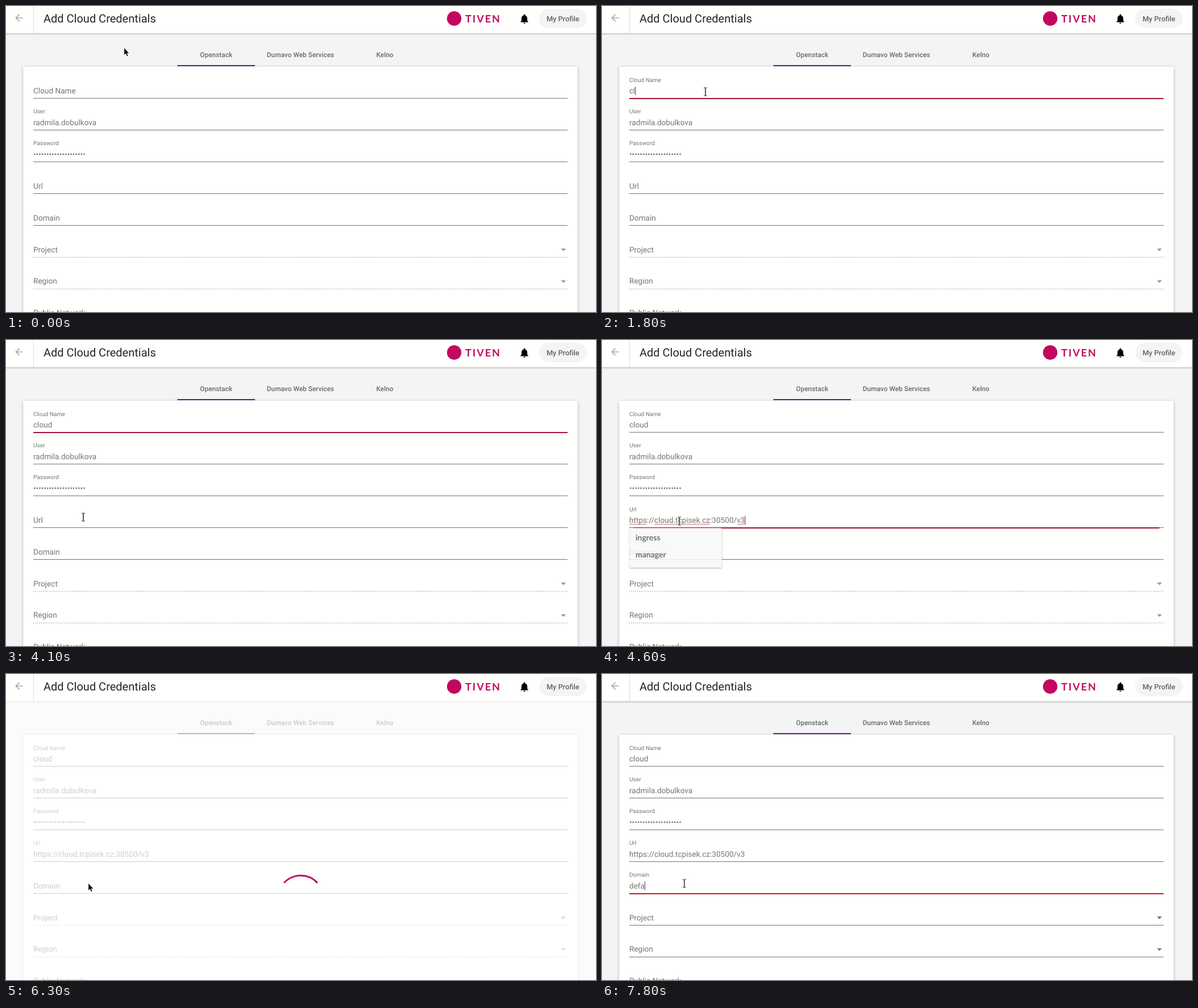
An HTML page that plays this animation: 1038x539 px, repeating every 8000 ms.

```html
<!DOCTYPE html>
<html lang="en">
<head>
<meta charset="utf-8">
<title>Add Cloud Credentials</title>
<style>
html, body { margin: 0; width: 100%; height: 100%; overflow: hidden; background: #f3f5f5; }
svg { display: block; width: 100vw; height: 100vh; }
text { font-family: Roboto, sans-serif; text-rendering: geometricPrecision; white-space: pre; }
.field { font-size: 13.6px; fill: #757575; }
.tab { font-size: 11.9px; font-weight: 500; fill: #696969; text-anchor: middle; }
.item { font: 700 14px Lato, sans-serif; fill: #5c5c5c; }
</style>
</head>
<body>
<svg id="stage" viewBox="0 0 1038 539" preserveAspectRatio="none">
  <defs>
    <filter id="cardShadow" x="-5%" y="-5%" width="110%" height="110%">
      <feDropShadow dx="0" dy="1.5" stdDeviation="2.6" flood-opacity=".32"/>
    </filter>
    <filter id="barShadow" x="-2%" y="-20%" width="104%" height="160%">
      <feDropShadow dx="0" dy="1" stdDeviation="1.8" flood-opacity=".3"/>
    </filter>
    <filter id="popShadow" x="-10%" y="-10%" width="120%" height="125%">
      <feDropShadow dx="0" dy="1" stdDeviation="1" flood-opacity=".4"/>
    </filter>
  </defs>
  <rect width="1038" height="539" fill="#f3f5f5"/>
  <rect x="-10" y="-10" width="1058" height="58" fill="#fffffd" filter="url(#barShadow)"/>
  <g id="page">
    <text class="tab" x="369.7" y="89.8">Openstack</text>
    <text class="tab" x="518" y="89.8">Dumavo Web Services</text>
    <text class="tab" x="666.5" y="89.8">Kelno</text>
    <rect x="30.5" y="107" width="975" height="460" rx="2" fill="#fffffd" filter="url(#cardShadow)"/>
    <rect x="301.5" y="104" width="136.5" height="2" fill="#6d1a86"/>
  </g>
  <g id="popup" filter="url(#popShadow)">
    <rect id="popupBox" x="48.5" width="162.5" rx="2" fill="#f8f9f8"/>
  </g>
  <g id="loader">
    <rect id="veil" y="48" width="1038" height="491" fill="#fffffd"/>
    <path id="spinner" d="M489 368A40 40 0 0 1 548 368" fill="none" stroke="#bd0a62" stroke-width="2.8"/>
  </g>
  <g id="header">
    <path d="M20 11H7.83l5.59-5.59L12 4l-8 8 8 8 1.41-1.41L7.83 13H20v-2z" transform="translate(12.8 10.8) scale(.85)" fill="#ababab"/>
    <rect x="48" width="1" height="48" fill="#dcdddc"/>
    <text x="66" y="29" font-size="20" fill="#252525">Add Cloud Credentials</text>
    <circle cx="788.5" cy="22" r="12.7" fill="#c2075f"/>
    <text x="808" y="28.8" fill="#c2075f" style="font:700 18px Lato,sans-serif;letter-spacing:2px">TIVEN</text>
    <path d="M12 22c1.1 0 2-.9 2-2h-4c0 1.1.89 2 2 2zm6-6v-5c0-3.07-1.64-5.64-4.5-6.32V4c0-.83-.67-1.5-1.5-1.5s-1.5.67-1.5 1.5v.68C7.63 5.36 6 7.92 6 11v5l-2 2v1h16v-1l-2-2z" transform="translate(901.8 12.4) scale(.85)"/>
    <rect x="938" y="5" width="83.5" height="34" rx="17" fill="#f3f5f4"/>
    <text x="979.8" y="26.6" font-size="12.75" font-weight="500" fill="#636363" text-anchor="middle">My Profile</text>
  </g>
  <path id="arrow" d="M0 0V12L2.7 9.6 4.7 14.2 6.6 13.3 4.6 8.9H8.2Z" fill="#111" stroke="#fff" stroke-width=".7" paint-order="stroke"/>
  <g id="beam" fill="none">
    <path d="M-3-7H-1Q0-7 0-6V6Q0 7-1 7H-3M3-7H1Q0-7 0-6V6Q0 7 1 7H3" stroke="#fff" stroke-width="2.6"/>
    <path d="M-3-7H-1Q0-7 0-6V6Q0 7-1 7H-3M3-7H1Q0-7 0-6V6Q0 7 1 7H3" stroke="#222" stroke-width="1"/>
  </g>
</svg>
<script>
const LOOP = 8000, LEFT = 48, WIDTH = 940, PITCH = 55.9;
const $ = id => document.getElementById(id);
const clamp = v => Math.max(0, Math.min(1, v));
const easeOut = v => 1 - (1 - clamp(v)) ** 3;

function add(parent, tag, attrs, text) {
  const el = document.createElementNS("http://www.w3.org/2000/svg", tag);
  for (const k in attrs) el.setAttribute(k, attrs[k]);
  if (text) el.textContent = text;
  parent.append(el);
  return el;
}
const set = (el, attrs) => { for (const k in attrs) el.setAttribute(k, attrs[k]); };
const show = (el, on) => el.setAttribute("visibility", on ? "visible" : "hidden");

// keys: [time, value]; popup: [opens, starts to fade, items]
const fields = [
  { label: "Cloud Name", focus: 900, blur: 4300, color: () => "#a31238",
    keys: [[1400, "c"], [1700, "cl"], [2000, "clou"], [2100, "cloud"]], popup: [1000, 1400, 3] },
  { label: "User", value: "radmila.dobulkova" },
  { label: "Password", value: "•".repeat(20) },
  { label: "Url", focus: 4300, blur: 5600, color: t => t < 4900 ? "#99102a" : "#c4121c",
    keys: [[4600, "https://cloud.tcpisek.cz:30500/v3"]], popup: [4400, 4600, 2] },
  { label: "Domain", focus: 6700, blur: 9000, color: () => "#d5101a",
    keys: [[6800, "d"], [6900, "de"], [7800, "defa"]], popup: [6700, 6900, 3] },
  { label: "Project", select: true },
  { label: "Region", select: true },
  { label: "Public Network", select: true }
];

const page = $("page");
fields.forEach((f, i) => {
  f.base = 154 + PITCH * i;
  f.lineY = 162 + 56 * i;
  f.labelEl = add(page, "text", { class: "field" }, f.label);
  f.valueEl = add(page, "text", { class: "field", x: LEFT, y: f.base }, f.value);
  f.lineEl = add(page, "path", { d: `M${LEFT} ${f.lineY + .5}h${WIDTH}`, stroke: "#737373" });
  if (f.select) f.mark = add(page, "path", { d: `M976.3 ${f.base - 27.6 + 25.4 - 4}h8.8l-4.4 4.4z` });
  if (f.keys) {
    f.focusEl = add(page, "rect", { y: f.lineY, height: 2 });
    f.caret = add(page, "rect", { y: f.base - 12, width: 1, height: 15, fill: "#6d1a86" });
  }
});

const popupItems = ["ingress", "manager", "cloud"].map(s => add($("popup"), "text", { class: "item", x: 59 }, s));

// spell-check waves under the words of the address
const url = fields[3];
const wave = (from, to) => {
  let d = `M${from} ${url.base + 2}`;
  for (let x = from, up = false; x < to; x += 2, up = !up) d += `l2 ${up ? -1.8 : 1.8}`;
  return d;
};
const waves = add(page, "path", { d: wave(48, 78) + wave(92, 189) + wave(238, 252),
  fill: "none", stroke: "#d8384a", "stroke-width": .9 });

// time, x, y, text pointer or arrow
const pointer = [
  [0, 208, 74, 0], [400, 186, 138, 0], [500, 186, 138, 0], [600, 186, 138, 1], [700, 182, 151, 1],
  [2900, 182, 151, 1], [3000, 181, 166, 0], [3200, 173.5, 205, 0], [3400, 177, 232, 0],
  [3500, 177, 232, 0], [3800, 165, 262, 0], [3900, 165, 262, 0], [4000, 151, 286, 0],
  [4100, 136, 312, 1], [4200, 136, 312, 1], [4300, 136, 319, 1], [4800, 136, 319, 1],
  [5100, 145.5, 369, 1], [5600, 146, 369, 0], [6500, 144.8, 369, 1], [8000, 144.8, 369, 1]
];

function drawPointer(t) {
  let i = 0;
  while (i < pointer.length - 2 && pointer[i + 1][0] <= t) i++;
  const [t0, x0, y0, beam] = pointer[i], [t1, x1, y1] = pointer[i + 1];
  const u = (t - t0) / (t1 - t0);
  const el = beam ? $("beam") : $("arrow");
  set(el, { transform: `translate(${x0 + (x1 - x0) * u} ${y0 + (y1 - y0) * u})` });
  show($("beam"), beam);
  show($("arrow"), !beam);
}

function drawField(f, t) {
  let value = f.value || "", last = f.focus;
  for (const [at, s] of f.keys || []) if (t >= at) { value = s; last = at; }
  if (f.valueEl.textContent !== value) f.valueEl.textContent = value;

  const p = f.focus ? easeOut((t - f.focus) / 400) : f.value ? 1 : 0;
  set(f.labelEl, { transform: `translate(${LEFT} ${f.base - 20.5 * p}) scale(${1 - .25 * p})` });

  if (f.select) {
    const ready = t >= 6500;
    set(f.lineEl, { "stroke-dasharray": ready ? "none" : "1.13 2.27" });
    set(f.mark, { fill: ready ? "#6e6e6e" : "#969696" });
  }
  if (f.keys) {
    const on = t >= f.focus && t < f.blur;
    const w = WIDTH * p;
    show(f.focusEl, on);
    set(f.focusEl, { x: LEFT + (WIDTH - w) / 2, width: w, fill: f.color(t) });
    show(f.caret, on && Math.floor((t - last) / 600) % 2 === 0);
    set(f.caret, { x: LEFT + (value ? f.valueEl.getComputedTextLength() : 0) });
  }
}

function drawPopup(t) {
  const f = fields.find(f => f.popup && t >= f.popup[0] && t < f.popup[1] + 200);
  show($("popup"), f);
  if (!f) return;
  const [, fade, count] = f.popup, top = f.lineY + 1;
  set($("popup"), { opacity: t < fade ? 1 : t < fade + 100 ? .88 : .4 });
  set($("popupBox"), { y: top, height: count * 30 + 10 });
  popupItems.forEach((el, i) => {
    set(el, { y: top + 22 + 30 * i });
    el.style.display = i < count ? "" : "none";
  });
}

function draw(ms) {
  const t = Math.floor(ms / 100) * 100;
  fields.forEach(f => drawField(f, t));
  show(waves, t >= 4600 && t < 5600);
  drawPopup(t);
  show($("loader"), t >= 5600 && t < 6500);
  set($("veil"), { opacity: .65 * clamp((t - 5500) / 300) });
  const spin = Math.min(t, 6300) - 6300;
  set($("spinner"), { transform: `rotate(${spin / 800 * 360} 518.5 395)` });
  drawPointer(t);
}

const start = performance.now();
function tick() {
  draw((performance.now() - start) % LOOP);
  requestAnimationFrame(tick);
}
tick();
</script>
</body>
</html>
```
